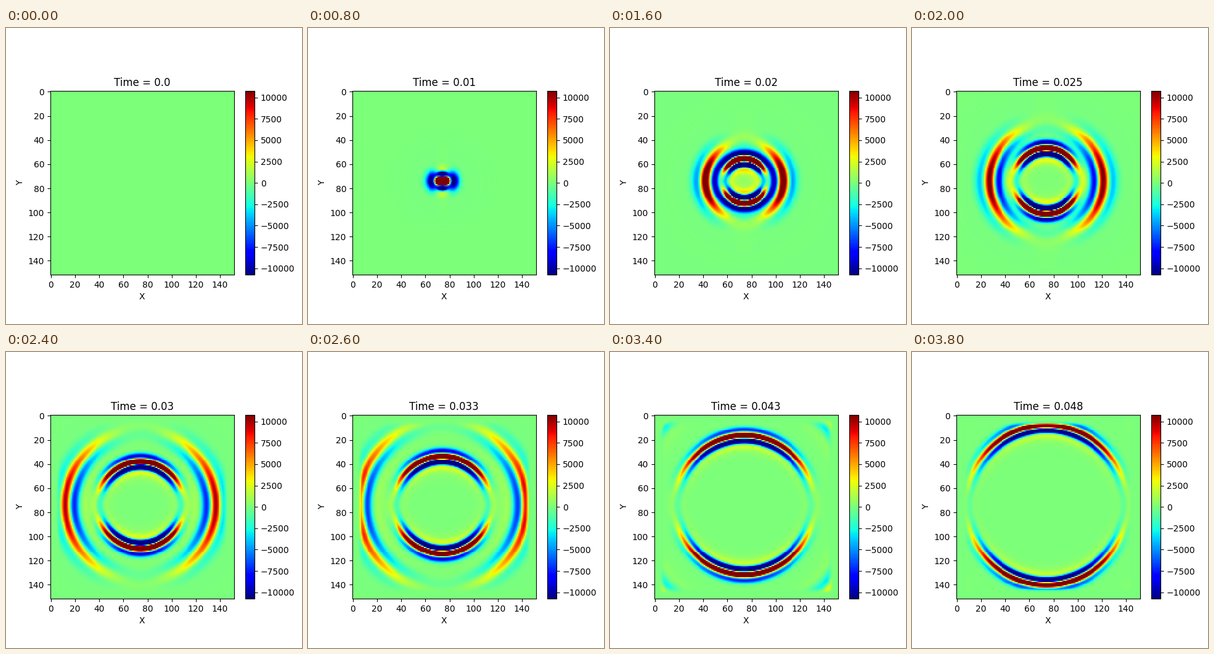
A matplotlib script for the animation above (4000 ms loop, 480 by 480 pixels).

```python
import numpy as np
import matplotlib.pyplot as plt
from matplotlib.animation import FuncAnimation

# Elastic medium on a staggered grid with unit spacing
N, SRC, PML = 152, 74, 10
VP, VS = 3000.0, 1732.0
DT, SKIP, FRAMES = 1e-4, 25, 20
F0, T0 = 140.0, 0.0099
CLIP, FRONT = 10750, 11600


def ricker(t):
    a = (np.pi * F0 * (t - T0)) ** 2
    return (1 - 2 * a) * np.exp(-a)


def damping(pos):
    """Recursive coefficients of the absorbing layer at the given positions."""
    depth = np.clip(np.maximum(PML - pos, pos - (N - 1 - PML)) / PML, 0, 1)
    d = (PML + 1) * VP * np.log(1e4) / (2 * PML) * depth ** 2
    alpha = np.pi * F0 * (1 - depth) + 1e-9
    b = np.exp(-(d + alpha) * DT)
    return d / (d + alpha) * (b - 1), b


def slope(f, axis, half):
    """Fourth-order staggered derivative, half a cell ahead or behind."""
    g = np.pad(f if axis == 0 else f.T, ((2, 2), (0, 0)))
    s = 2 if half else 1
    p, q, r, t = (g[s + k:s + k + N] for k in (-1, 0, 1, 2))
    d = 9 / 8 * (r - q) - (t - p) / 24
    return d if axis == 0 else d.T


def simulate():
    lam, mu = VP ** 2 - 2 * VS ** 2, VS ** 2
    vx, vy, sxx, syy, sxy = np.zeros((5, N, N))
    grid = np.arange(N)
    coef = {False: damping(grid), True: damping(grid + 0.5)}
    memory = {}

    def deriv(key, f, axis, half):
        d = slope(f, axis, half)
        a, b = (c if axis == 1 else c[:, None] for c in coef[half])
        memory[key] = b * memory.get(key, 0) + a * d
        return d + memory[key]

    snaps = [vx.copy()]
    for n in range(1, SKIP * (FRAMES - 1) + 1):
        exx = deriv("vx_x", vx, 1, True)
        eyy = deriv("vy_y", vy, 0, False)
        exy = deriv("vx_y", vx, 0, True) + deriv("vy_x", vy, 1, False)
        sxx += DT * ((lam + 2 * mu) * exx + lam * eyy)
        syy += DT * (lam * exx + (lam + 2 * mu) * eyy)
        sxy += DT * mu * exy
        vx += DT * (deriv("sxx_x", sxx, 1, False) + deriv("sxy_y", sxy, 0, False))
        vy += DT * (deriv("sxy_x", sxy, 1, True) + deriv("syy_y", syy, 0, True))
        vx[SRC, SRC] += DT * ricker(n * DT)
        if n % SKIP == 0:
            snaps.append(vx.copy())
    # Calibrate on the pressure front travelling to the right
    peak = snaps[10][SRC, 112:130].max()
    return np.array(snaps) * FRONT / peak


def label(i):
    ms = np.floor(i * SKIP * DT * 1000 + 0.5 + 1e-6)
    return f"Time = {float(ms) / 1000}"


waves = simulate()

fig = plt.figure(figsize=(4.8, 4.8), dpi=100)
bottom, size = 80 / 480, 0.62
ax = fig.add_axes([0.15, bottom, size, size])
cax = fig.add_axes([0.80875, bottom, 0.031, size])
im = ax.imshow(waves[0], cmap="jet", vmin=-CLIP, vmax=CLIP,
               interpolation="nearest")
fig.colorbar(im, cax=cax)
ax.set_xticks(range(0, N, 20))
ax.set_yticks(range(0, N, 20))
ax.set_xlabel("X")
ax.set_ylabel("Y")
title = ax.set_title(label(0))


def update(i):
    im.set_data(waves[i])
    title.set_text(label(i))
    return im, title


anim = FuncAnimation(fig, update, frames=FRAMES, interval=200, repeat=True)
plt.show()
```
